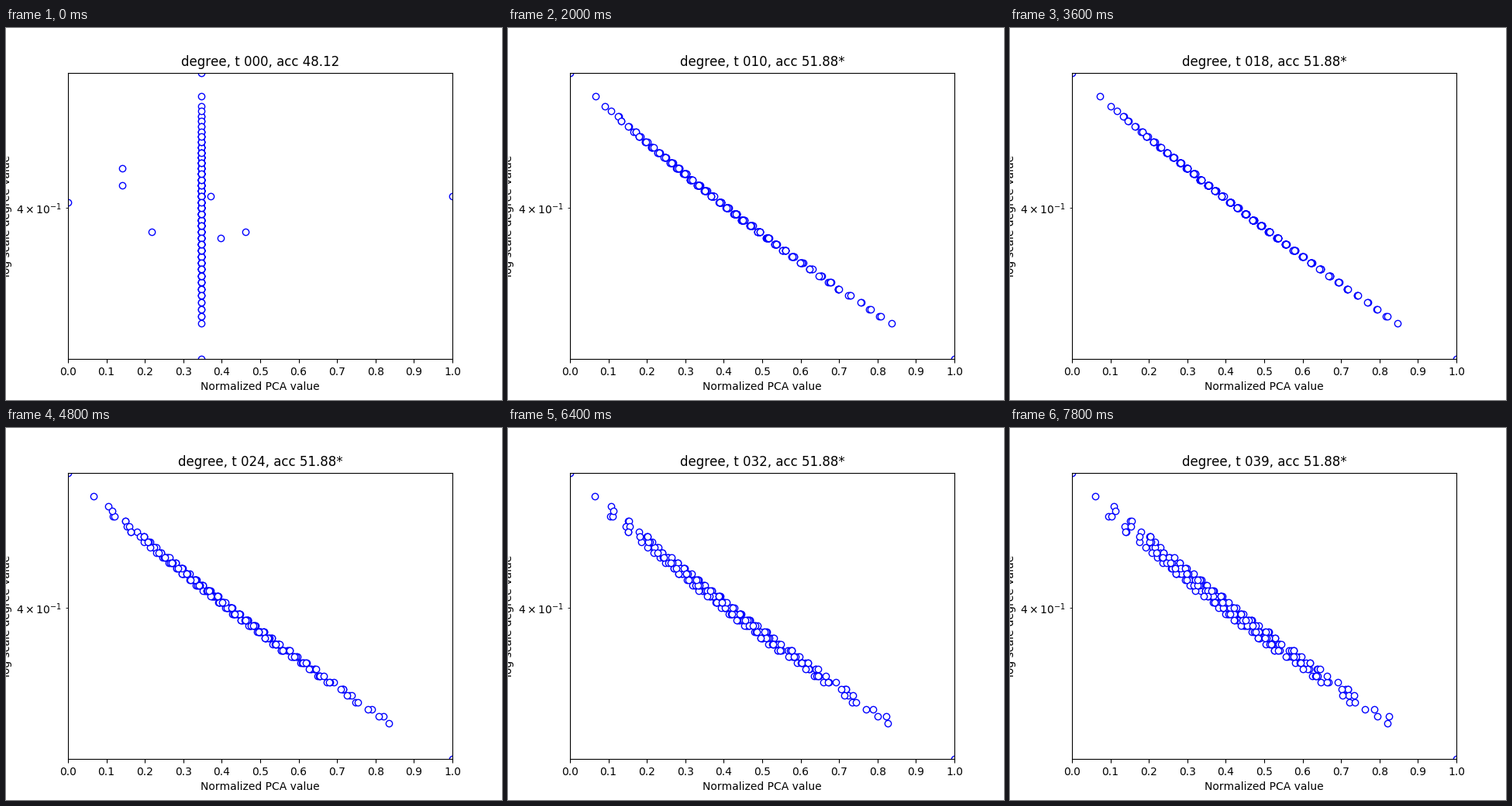
A matplotlib script that plays this animation: 640x480 px, repeating every 8 s.

```python
import numpy as np
import matplotlib.pyplot as plt
from matplotlib.animation import FuncAnimation
from matplotlib.ticker import FixedFormatter, FixedLocator, NullLocator

plt.rcParams["text.kerning_factor"] = 6

FRAMES, INTERVAL = 40, 200
N = 266                 # graph nodes
K_MIN, K_MAX = 83, 132  # degree range
START = 0.347           # common position before the first step
# Nodes that start elsewhere: (degree, position)
STRAYS = [(107, 0), (113, .142), (110, .142), (102, .218),
          (108, .371), (101, .397), (102, .462), (108, 1)]
rng = np.random.default_rng(4)


def make_degrees():
    """Bell-shaped degree counts around 106, with sparse extremes."""
    levels = np.array([K_MIN, *range(88, 126), 127, K_MAX])
    bell = N * .0487 * np.exp(-(levels - 106) ** 2 / 135)
    counts = np.maximum(1, np.round(bell)).astype(int)
    return rng.permutation(np.repeat(levels, counts))


def trend(power):
    """Position as a falling power of the degree, 0 at the top degree."""
    low, high = float(K_MAX) ** -power, float(K_MIN) ** -power
    x = .986 * (degree ** -power - low) / (high - low)
    return np.where(degree == K_MIN, 1, x)


def start_positions():
    x = np.full(len(degree), START)
    for k, pos in STRAYS:
        x[np.flatnonzero((degree == k) & (x == START))[0]] = pos
    return x


degree = make_degrees().astype(float)
first = start_positions()
inside = (degree > K_MIN) & (degree < K_MAX)
final = trend(1.1) + inside * rng.uniform(-.026, .026, len(degree))


def positions(t):
    if t == 0:
        return first
    curve = trend(np.interp(t, [1, 12, 18], [1.05, 1, .66]))
    spread = np.interp(t, [1, 7, 18, 24, 39], [-1, -.2, -.1, .41, 1])
    return curve + spread * (final - curve)


fig, ax = plt.subplots(figsize=(6.4, 4.8), dpi=100)
dots, = ax.plot(first, degree / (N - 1), "o", mfc="white", mec="blue",
                ms=6, mew=1)
ax.set_yscale("log")
ax.set_xlim(0, 1)
ax.set_ylim(K_MIN / (N - 1), K_MAX / (N - 1))
ax.set_xticks(np.arange(11) / 10)
ax.yaxis.set_major_locator(NullLocator())
ax.yaxis.set_minor_locator(FixedLocator([0.4]))
ax.yaxis.set_minor_formatter(
    FixedFormatter([r"$\mathdefault{4\times10^{-1}}$"]))
ax.set_xlabel("Normalized PCA value")
ax.set_ylabel("log scale degree value")
title = ax.set_title("")


def draw(t):
    dots.set_xdata(positions(t))
    acc = "48.12" if t == 0 else "51.88*"
    title.set_text(f"degree, t {t:03d}, acc {acc}")
    return dots, title


anim = FuncAnimation(fig, draw, frames=FRAMES, interval=INTERVAL,
                     repeat=True, repeat_delay=0)
plt.show()
```
